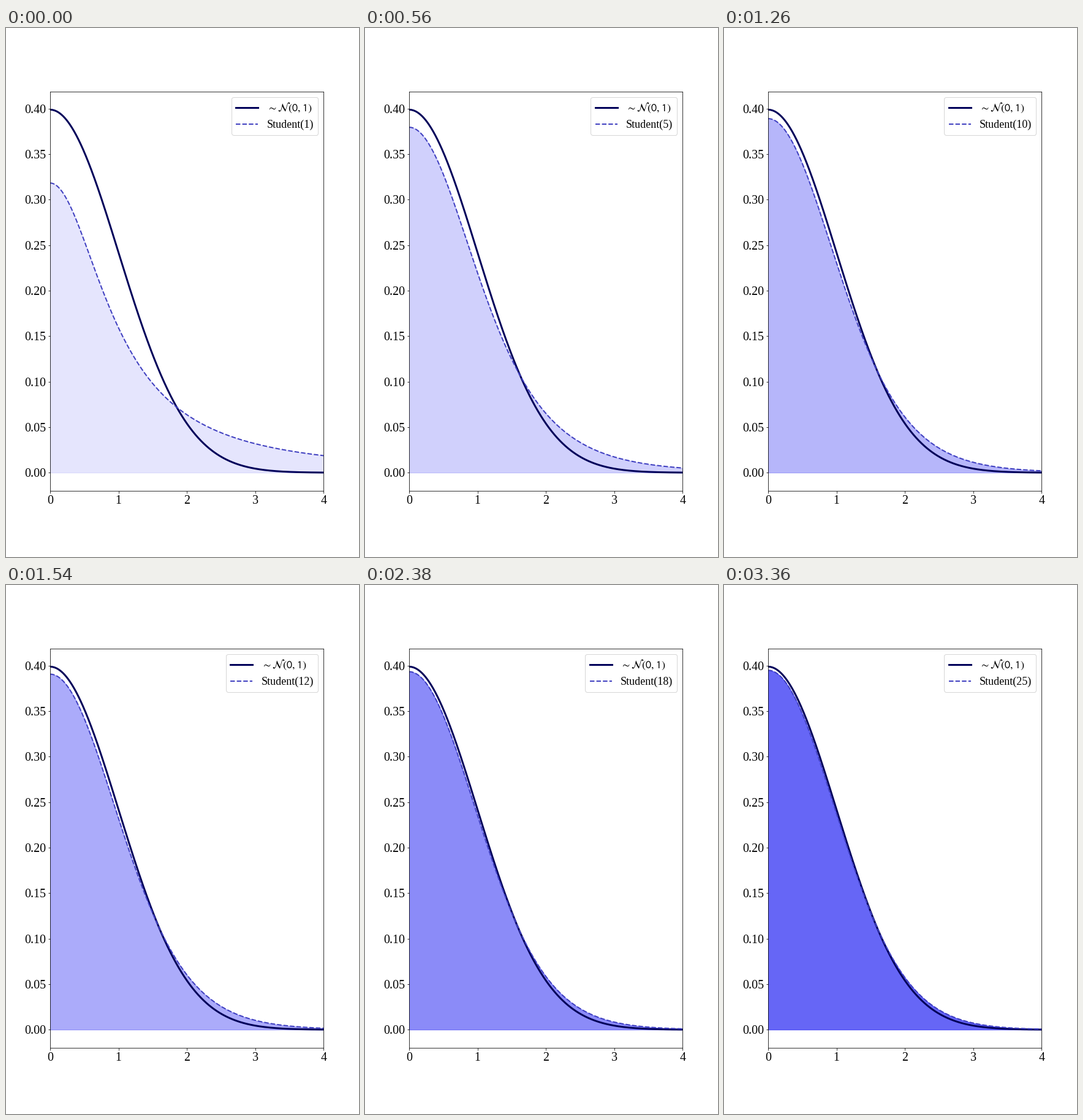
Recreate the animation shown at these times as a matplotlib script. Size 576x864 px, loop 3.5 s.

```python
import math

import matplotlib.pyplot as plt
import numpy as np
from matplotlib.animation import FuncAnimation

FRAMES, INTERVAL = 25, 140
NAVY, DASH, FILL = "#00005a", "#4040c0", "#0000f0"

plt.rcParams["font.family"] = "Liberation Serif"
plt.rcParams["mathtext.fontset"] = "stixsans"


def normal_pdf(x):
    return np.exp(-x**2 / 2) / math.sqrt(2 * math.pi)


def student_pdf(x, n):
    scale = math.gamma((n + 1) / 2) / (math.sqrt(n * math.pi) * math.gamma(n / 2))
    return scale * (1 + x**2 / n) ** (-(n + 1) / 2)


x = np.linspace(0, 4, 500)
peak = normal_pdf(0)

fig, ax = plt.subplots(figsize=(8, 12), dpi=72)
fig.subplots_adjust(left=0.125, right=0.9, bottom=0.125, top=0.88)


def draw(frame):
    n = frame + 1
    y = student_pdf(x, n)
    ax.clear()
    ax.plot(x, normal_pdf(x), color=NAVY, lw=3, label=r"$\sim\mathcal{N}(0,1)$")
    ax.plot(x, y, "--", color=DASH, lw=2, label=f"Student({n})")
    ax.fill_between(x, y, color=FILL, alpha=0.1 + 0.5 * frame / (FRAMES - 1))
    ax.set_xlim(0, 4)
    ax.set_ylim(-0.02, peak + 0.02)
    ax.set_xticks(range(5))
    ax.tick_params(labelsize=20)
    ax.legend(loc="upper right", fontsize=18)


anim = FuncAnimation(fig, draw, frames=FRAMES, interval=INTERVAL,
                     init_func=lambda: None, repeat=True, repeat_delay=0)
plt.show()
```
